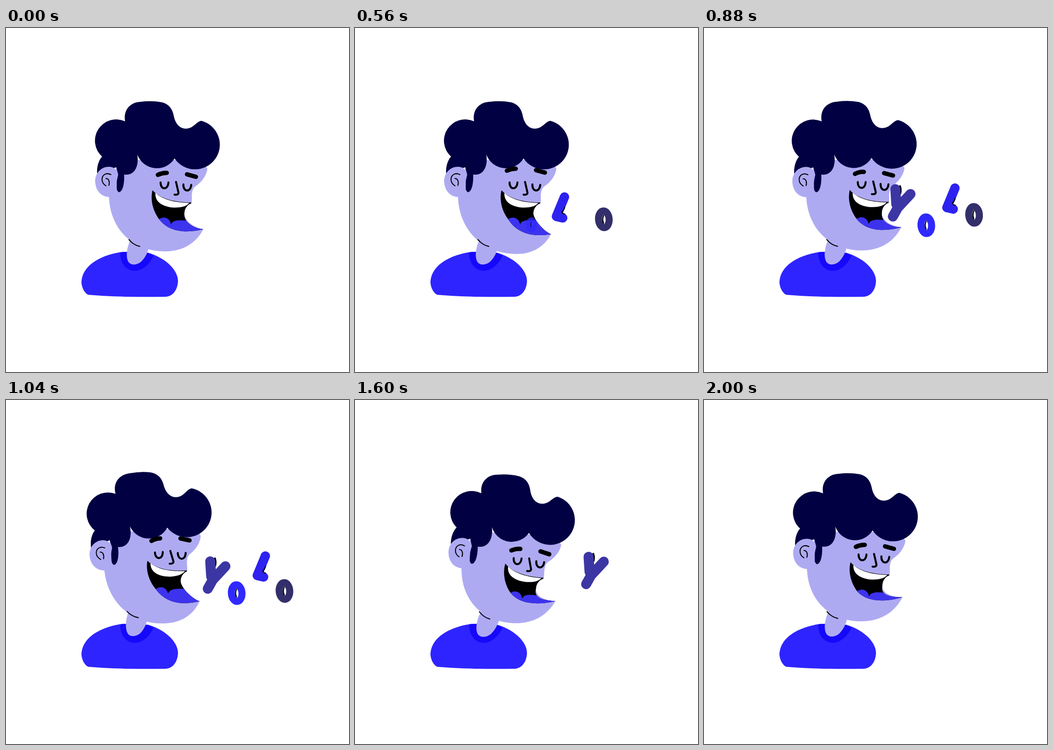
These frames come from a looping animation (700x704 px, 2.04 s). An HTML page:

```html
<!DOCTYPE html>
<html lang="en">
<head>
<meta charset="utf-8">
<title>Talking head</title>
<style>
html, body { margin: 0; width: 100%; height: 100%; overflow: hidden; background: #fff; }
svg { display: block; width: 100vw; height: 100vh; }
.line { fill: none; stroke: #000; stroke-linecap: round; stroke-linejoin: round; }
.skin { fill: #aeaaf2; }
#word { fill: none; stroke-linecap: round; stroke-linejoin: round; }
</style>
</head>
<body>
<svg viewBox="0 0 700 704">
  <defs>
    <clipPath id="mouthClip"><path id="clip"/></clipPath>
    <g id="O">
      <ellipse rx="10.8" ry="17" stroke-width="14.4" transform="rotate(-4)"/>
      <path d="M-.5 -8Q-4 0 -.5 8" stroke="#000" stroke-width="2.4"/>
    </g>
    <g id="L">
      <path d="M8.500 -22L-8 18L5 21" stroke-width="19"/>
      <path d="M9 -1Q7 6 3.500 8Q3 12 9 13" stroke="#000" stroke-width="2"/>
    </g>
    <g id="Y">
      <path d="M-3.500 -34Q-1 -27 -3 -19" stroke="#000" stroke-width="4"/>
      <path d="M-13 -28L-11 3M18 -18L-8 10L-18 28" stroke-width="20.5"/>
    </g>
  </defs>

  <path fill="#2e24ff" d="M154 520C155 490 185 466 238 458L290 460C325 470 351 495 351 518C350 537 340 549 326 550C270 551 215 550 168 546C160 543 154 530 154 520Z"/>
  <path fill="#1508fb" d="M233 459.500C233 485 248 497 263 497S294 483 301 466L290 460L247 458Z"/>

  <g id="head">
    <path class="skin" d="M254 433C246 450 244 470 250 479C256 487 270 485 278 476Q288 465 292 448Z"/>
    <path class="skin" id="face"/>
    <path class="line" stroke-width="2" d="M251 433Q260 444 273 447"/>
    <path fill="#010042" d="M186 298C185 284 189 271 196 263A43.500 43.500 0 0 1 243 191C239 168 253 152 275 151Q297 148 318 152C334 156 340 168 342 178C345 195 354 206 367 206C383 206 388 191 399 190A50.500 50.500 0 1 1 344 267A42.500 42.500 0 0 1 268 259C272 283 262 303 241 300C242 312 240 336 230 336C222 330 226 312 229 300L225 285Z"/>
    <path class="skin" d="M228 300C227 290 220 284 210 284C194 284 182 297 182 313C182 332 194 346 212 346L226 340V310Z"/>
    <path class="line" stroke-width="2" d="M214 300C204 295 196 301 196 310Q196 318 204 323M204 308C210 308 212 315 210 322"/>
    <path id="mouth"/>
    <path fill="#3d33ee" clip-path="url(#mouthClip)" d="M306 398C315 384 333 384 337 402C340 392 355 393 368 394L410 395V430H306Z"/>
    <path fill="#fff" d="M305 337.500C320 351.500 345 357.500 374 358C370 363 362 367.500 345 367.500S303 360 305 337.500Z"/>
    <g id="features">
      <path class="line" stroke-width="4" d="M315.500 316C315 332 331 332 331.500 316M362 320C361 336 377 337 378 321M347 315L352 337Q352 342 344 341"/>
      <path class="line" id="brows" stroke-width="9" d="M310 300.500Q319 296 328 296.500M369.500 299.500Q378 302 387.500 304.500"/>
    </g>
  </g>
  <g id="word"></g>
</svg>
<script>
const LOOP = 2040, STEP = 40;
const MOUTH = { x: 350, y: 404 };
const $ = id => document.getElementById(id);
const clamp = v => Math.max(0, Math.min(1, v));
const mix = (a, b, u) => a + (b - a) * u;
const ease = u => (1 - Math.cos(Math.PI * clamp(u))) / 2;
const bump = (t, mid, half) => 1 - ease(Math.abs(t - mid) / half);
const place = (node, transform) => node.setAttribute('transform', transform);

// Letters in the order they leave the mouth; x and y are where each one floats, sway its bobbing direction.
const letters = [
  { glyph: 'O', color: '#332f6b', x: 457, y: 389, sway: 1 },
  { glyph: 'L', color: '#2e22f0', x: 409.5, y: 343, sway: -1 },
  { glyph: 'O', color: '#3029ff', x: 359.5, y: 397, sway: -1 },
  { glyph: 'Y', color: '#3c36a4', x: 318.5, y: 356.5, sway: 1 }
];

for (const l of letters) {
  l.node = $(l.glyph).cloneNode(true);
  l.node.removeAttribute('id');
  l.node.setAttribute('stroke', l.color);
  $('word').append(l.node);
}

// Every letter flies from the mouth to its floating place, which drifts right and bobs.
function drawLetter({ node, x, y, sway }, i, t) {
  const age = t - (220 + 120 * i);
  const left = 1480 + 30 * i * i - t;
  const fly = ease(age / 400), grow = clamp(age / 160);
  const floatX = x + 0.107 * t;
  const floatY = y + 8 * sway * Math.cos(Math.PI * (t - 1220) / 420);
  place(node, `translate(${mix(MOUTH.x, floatX, fly)} ${mix(MOUTH.y, floatY, fly)}) scale(${grow})`);
  node.setAttribute('opacity', clamp(Math.min(1.2 * grow, left / 40)));
}

// open: 0 is the jaw at rest, 1 is wide open.
function drawJaw(open) {
  const to = (a, b) => mix(a, b, open);
  const x = to(405, 400), y = to(403.5, 422), chin = to(453, 462.5);
  const tip = `${x} ${y}`, inner = to(y, y - 4);
  $('face').setAttribute('d',
    `M210 340C210 410 258 ${chin} ${to(320, 330)} ${chin}C${to(362, 366)} ${chin} ${to(390, 388)} ${to(433, 444)} ${tip}` +
    `C${x - to(20, 12)} ${inner} ${to(364, 366)} ${to(397, 395)} 364 380C364 369 371 361 378 359` +
    'L379 357C380 345 377 335 385 325C395 319 409 305 411 288L400 270H230Z');
  const mouth =
    'M299 332C315 350 345 357 378 357V359C371 361 364 369 364 380' +
    `C${to(360, 366)} ${to(399, 395)} ${x - to(27, 12)} ${inner} ${tip}` +
    `C375 ${to(412.5, 426.5)} 335 ${to(416, 427)} 313 392C300 375 294 352 299 332Z`;
  $('mouth').setAttribute('d', mouth);
  $('clip').setAttribute('d', mouth);
}

function draw(t) {
  const nod = 2.85 * bump(t, 1600, 400) - 5.75 * bump(t, 1200, 400);
  const lift = 11 * (bump(t, 450, 350) + bump(t, 1150, 350));
  place($('head'), `rotate(${nod} 248 490)`);
  place($('features'), `translate(0 ${1.4 * Math.max(0, nod)})`);
  place($('brows'), `translate(0 ${-lift})`);
  drawJaw(t < 1245 ? ease((t + 105) / 225 % 2) : 0);
  letters.forEach((l, i) => drawLetter(l, i, t));
}

// The jaw's ease above would hold past 1, so mirror it with a full cosine wave.
const chew = t => t < 1245 ? 0.5 + 0.5 * Math.cos(2 * Math.PI * (t - 120) / 450) : 0;
const start = performance.now();
function tick() {
  const t = Math.floor((performance.now() - start) % LOOP / STEP) * STEP;
  draw(t);
  drawJaw(chew(t));
  requestAnimationFrame(tick);
}
tick();
</script>
</body>
</html>
```
